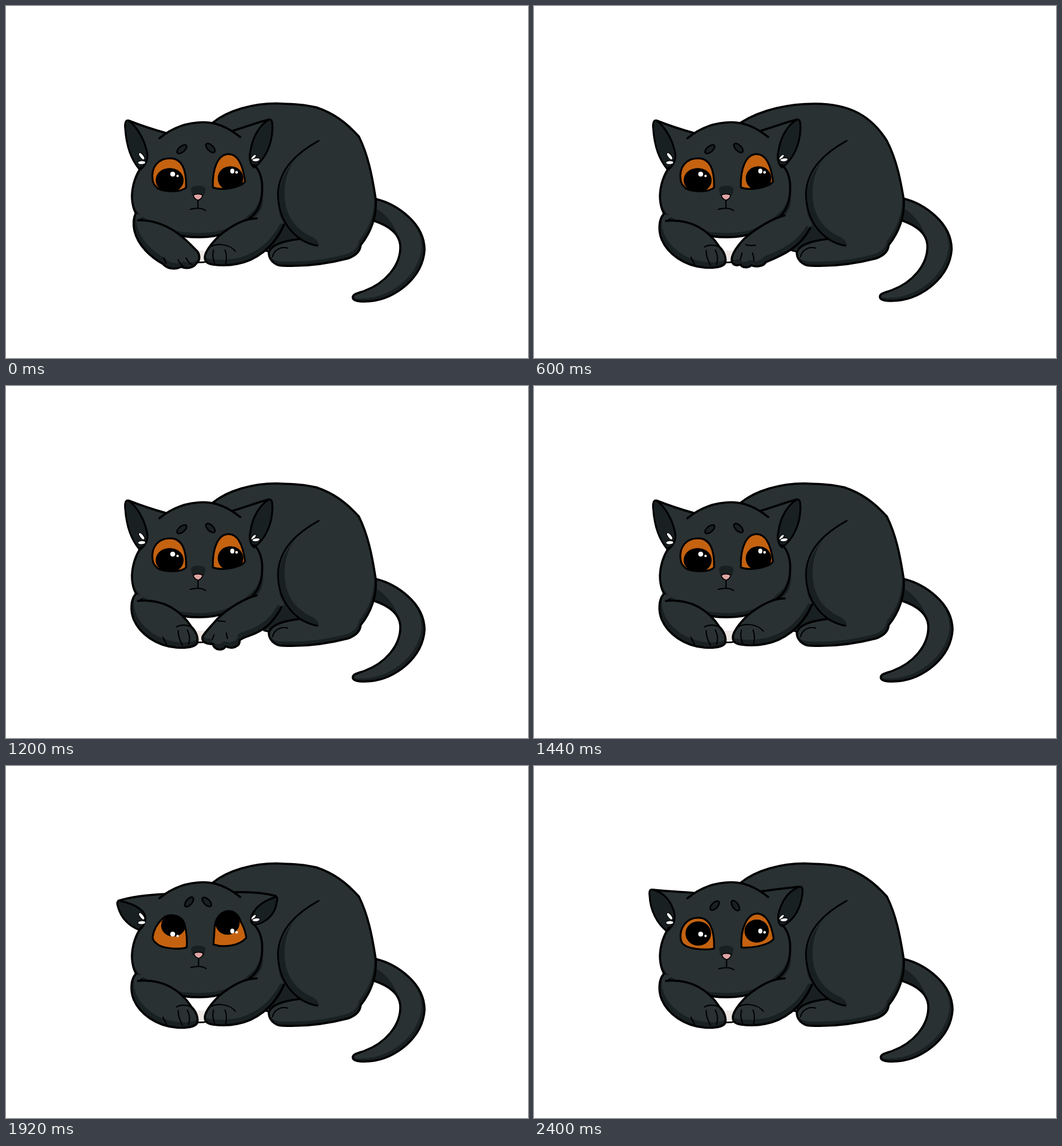
Recreate the animation shown at these times as an HTML page with a canvas. Size 858 px wide and 580 px high, loop 2.52 s.

```html
<!DOCTYPE html>
<html lang="en">
<head>
<meta charset="utf-8">
<title>Kneading cat</title>
<style>
html, body { margin: 0; width: 100%; height: 100%; overflow: hidden; background: #fff; }
canvas { display: block; }
</style>
</head>
<body>
<canvas id="stage" width="858" height="580"></canvas>
<script>
const c = document.getElementById('stage').getContext('2d');
const FUR = '#293133', DARK = '#192022', ORANGE = '#c46210', PINK = '#dea5a4';
const STEP = 120;

// One digit per step: how far each paw presses, and how far the gaze is raised
const LEFT  = '121000121000012100000';
const RIGHT = '000121000121000001210';
const LOOK  = '000000000000012222221';

const BACKS = [
  'C365,172 405,160.5 445,160.5 C470,161.5 490,162 510,167 C540,177 560,193 580,215 C595,245 602,280 608,320',
  'C375,170 420,161 462,161 C520,161 555,182 580,222 C597,255 603,290 608,320'
];
const RUMP = 'C609,352 598,375 583,394 C582,406 573,412 562,416 C535,423 500,430 455,428' +
  ' C440,428 431,416 432,405';
const TAIL = 'M600,318 L608,318 C641,326 688,357 688,402 C685,447 641,483 598,486.5' +
  ' C580,488 570,486 570,480 C570,474 580,473 590,469 C622,457 650,428 648,394 C646,373 626,361 605,354 L596,350';
const HEAD_TOP = 'M252,218 C275,199 298,191.5 325,191.5 C350,191.5 369,203 385,216';
const HEAD_SIDE = 'C417,270 422,286 421,304 C420,325 413,341 400,350 C378,372 350,381 318,381' +
  ' C282,381 250,373 222,352 C210,342 207,328 207,312 C208,292 213,279 222,266';

const LEFT_ARMS = [
  'M213,343 C205,352 204,370 210,385 C220,408 246,428 280,431 C296,432 310,430 314,424' +
    ' C317,415 312,404 305,397 C288,371 260,350 217,354',
  'M213,342 C209,350 209,360 211,370 C217,395 238,414 258,425 C265,433 277,435 288,430' +
    ' C298,434 309,431 313,424 C319,420 319,411 315,405 C300,389 268,352 217,353',
  'M212,343 C209,360 210,375 218,385 C227,399 245,411 263,419 C259,431 265,439 276,438' +
    ' C284,438 287,434 288,431 C295,436 308,435 312,429 C322,427 322,415 317,408 C302,393 265,361 217,354'
];
const LEFT_TOES = [
  'M280,397 C287,393 297,393 304,397 M283,403 C283,413 286,420 290,427 M298,402 C302,410 303,418 300,426 M258,414 L264,426',
  'M283,418 C285,423 288,427 292,429 M296,415 C299,421 302,425 306,426 M259,415 L263,424',
  'M284,413 L289,418 M297,411 L304,416'
];
const RIGHT_ARMS = [
  'M412,350 C390,350 368,364 350,379 C338,391 329,402 327,412 C326,420 330,425 340,426' +
    ' C355,428 370,427 380,425 C408,420 440,400 457,360',
  'M412,345 C392,350 365,366 345,384 C332,398 324,410 325,420 C327,428 334,428 339,426' +
    ' C343,432 353,432 357,427 C364,431 378,429 381,422 C405,412 436,400 454,366',
  'M412,345 C392,350 365,366 347,384 C338,395 328,404 323,413 C321,422 330,426 340,425' +
    ' C342,436 357,437 361,429 C371,434 385,430 384,419 C392,412 405,412 420,402 C436,393 446,377 453,364'
];
const RIGHT_TOES = [
  'M335,397 C346,391 366,391 377,404 M341,402 C339,410 340,417 343,424 M360,402 C363,410 363,417 361,425',
  'M348,393 C352,395 358,395 364,394 M342,407 L339,419 M359,407 C361,412 362,416 361,420',
  'M348,387 L360,388 M342,410 L339,418 M362,407 L364,416'
];

// Per gaze: ear top edges, ear rims (tip to base), inner edges, eyes, pupils, brows
const FACES = [{
  earTops: ['M262,209 C240,203 220,196 202,189', 'M368,207 C390,201 412,192 432,187'],
  rims: ['M202,189 C196,186 195,195 196,203 C198,233 207,255 220,270', 'M432,187 C438,186 438,193 438,203 C437,227 427,252 408,266'],
  folds: ['C231,262 235,250 231,238 C227,219 215,199 202,189', 'C401,261 399,250 402,238 C405,217 416,197 432,187'],
  eyes: ['M241,286 C238,265 251,251 269,251 C289,250 297,270 296,299 C289,307 262,307 250,301 C244,296 241,291 241,286Z',
    'M340,299 C339,266 349,244 366,244 C383,244 390,267 393,289 C387,299 355,305 340,299Z'],
  pupils: [[269, 287, 23, 20], [369, 284, 21, 20]],
  brows: [[289, 236, -40], [336, 234, 45]], nose: 0
}, {
  earTops: ['M262,209 C240,207 215,206 196,204', 'M370,207 C392,204 414,201 436,199'],
  rims: ['M196,204 C190,202 189,207 190,214 C191,239 203,260 218,272', 'M436,199 C442,198 442,204 441,212 C438,235 427,254 408,264'],
  folds: ['C232,263 234,248 228,234 C222,219 211,208 196,204', 'C401,261 399,250 404,236 C410,218 421,205 436,199'],
  eyes: ['M241,285 C239,265 252,250 270,250 C289,250 297,270 296,301 C280,304 250,302 243,291Z',
    'M341,299 C339,268 350,244 367,243 C384,244 391,265 394,285 C384,297 355,300 341,299Z'],
  pupils: [[270, 276, 21, 20], [366, 272, 20, 19]],
  brows: [[297, 230, -46], [331, 230, 55]], nose: -1
}, {
  earTops: ['M262,211 C237,212 210,214 185,222', 'M372,208 C397,207 424,209 443,214'],
  rims: ['M185,222 C181,224 183,229 184,232 C189,251 203,264 219,270', 'M443,214 C447,216 446,220 445,225 C442,245 428,258 408,262'],
  folds: ['C230,262 232,249 225,240 C214,229 201,225 185,222', 'C400,258 402,247 408,239 C417,226 430,220 443,216'],
  eyes: ['M241,282 C243,267 250,258 257,252 C265,242 289,243 294,262 C297,275 298,287 297,299 C285,303 255,301 247,292 C243,289 241,286 241,282Z',
    'M343,265 C345,245 358,238 368,239 C380,241 384,250 386,257 C392,267 394,275 395,283 C382,298 355,299 341,294Z'],
  pupils: [[275, 263, 20, 18], [364, 258, 20, 20]],
  brows: [[301, 224, -50], [330, 224, 45]], nose: -3
}];

function fill(d, color) {
  c.fillStyle = color;
  c.fill(new Path2D(d));
}

function line(d, width = 3.5) {
  c.lineWidth = width;
  c.stroke(new Path2D(d));
}

// Fur with a dark rim on the sides opposite to the offset
function fur(d, dx, dy) {
  c.save();
  c.clip(new Path2D(d));
  fill(d, DARK);
  c.translate(dx, dy);
  fill(d, FUR);
  c.restore();
}

function ellipse(x, y, rx, ry, color, turn = 0, outline = 0) {
  c.beginPath();
  c.ellipse(x, y, rx, ry, turn * Math.PI / 180, 0, 7);
  c.fillStyle = color;
  c.fill();
  if (outline) {
    c.lineWidth = outline;
    c.stroke();
  }
}

function drawTail(wobble) {
  c.save();
  c.translate(-1.5 * wobble, -wobble);
  fur(TAIL, -5, -5);
  fill('M606,332 C627,345 641,361 649,394 C645,372 630,362 606,355Z', DARK);
  line(TAIL);
  c.restore();
}

function drawBody(wobble) {
  const edge = 'M340,192 ' + BACKS[wobble] + RUMP;
  fur(edge + 'L424,403 L385,395 L340,340Z', -3, -7);
  fill('M457,360 L482,384 C465,384 450,388 434,399 L424,403Z', DARK);
  fill('M485,243 C463,262 457,290 458,315 C460,345 475,367 502,380 C516,386 517,398 508,396' +
    ' C480,390 460,370 450,345 C443,310 450,275 485,243Z', DARK);
  line(edge + 'C437,394 455,387 482,384');
  line('M514,222 C480,241 449,267 447,309 C447,355 475,388 512,395 M424,403 L433,405', 2.8);
  line('M438,413 C441,401 452,396 463,399', 2);
  fill('M420,295 C427,325 420,345 400,352Z', DARK);
}

function drawHead(face) {
  fill('M275,372 L355,376 L326,423 L314,423Z', '#fff');
  fill('M308,403 L334,403 L326,422 L314,422Z', '#eee8e5');
  line('M310,422 C317,423 323,423 331,421', 2.5);

  face.earTops.forEach((top, i) => {
    fill(top + face.rims[i].replace(/^M[\d,]+/, '') + (i ? 'L385,222Z' : 'L252,222Z'), FUR);
    line(top);
  });
  fur(HEAD_TOP + 'L408,262' + HEAD_SIDE + 'Z', 0, -7);
  face.rims.forEach((rim, i) => {
    fill(rim + face.folds[i], DARK);
    line(rim + face.folds[i], 3);
  });
  line(HEAD_TOP);
  line('M408,262' + HEAD_SIDE);

  [[223, 247.5, 7, 3, 52], [223, 258, 6.5, 3.2, -5], [407, 249, 5.5, 2.5, -45], [411, 253.5, 6.5, 3, -8]]
    .forEach(([x, y, rx, ry, turn]) => ellipse(x, y, rx, ry, '#fff', turn, 1.3));
}

function drawFace(face) {
  face.eyes.forEach((eye, i) => {
    c.save();
    c.clip(new Path2D(eye));
    fill(eye, ORANGE);
    ellipse(...face.pupils[i], '#000');
    c.restore();
    line(eye, 3);
  });
  ellipse(274, 277, 4, 4, '#fff');
  ellipse(282, 280, 2, 2, '#fff');
  ellipse(372, 272, 3.4, 4, '#fff');
  ellipse(379, 274, 2.2, 2.2, '#fff');

  for (const [x, y, turn] of face.brows) ellipse(x, y, 9.5, 4.8, DARK, turn, 2.4);

  fill('M304,302 C304,294 328,294 328,302 L326,312 L306,312Z', DARK);
  c.save();
  c.translate(face.nose ? 1 : 0, face.nose);
  const nose = 'M308,312 C311,309 320,309 323,312 C323,316 319,319 316,320 C312,319 308,316 308,312Z';
  fill(nose, PINK);
  line(nose, 1.5);
  line('M315.5,320 L315.5,333 M303,335 C311,333 321,332 328,337', 2);
  c.restore();
}

// The joint is a point inside the body that closes the arm without a gap
function drawArm(arm, toes, dx, joint) {
  fur(arm + 'L' + joint + 'Z', dx, -9);
  line(arm);
  line(toes, 2);
}

function draw(now) {
  const step = Math.floor(now / STEP) % LOOK.length;
  const wobble = step % 2, face = FACES[LOOK[step]];
  const l = LEFT[step], r = RIGHT[step];
  c.fillStyle = '#fff';
  c.fillRect(0, 0, 858, 580);
  drawTail(wobble);
  drawBody(wobble);
  drawHead(face);
  drawFace(face);
  drawArm(LEFT_ARMS[l], LEFT_TOES[l], 4, '227,346');
  drawArm(RIGHT_ARMS[r], RIGHT_TOES[r], -3, '435,352');
}

c.lineCap = c.lineJoin = 'round';
const start = performance.now();
function tick() {
  draw(performance.now() - start);
  requestAnimationFrame(tick);
}
tick();
</script>
</body>
</html>
```
